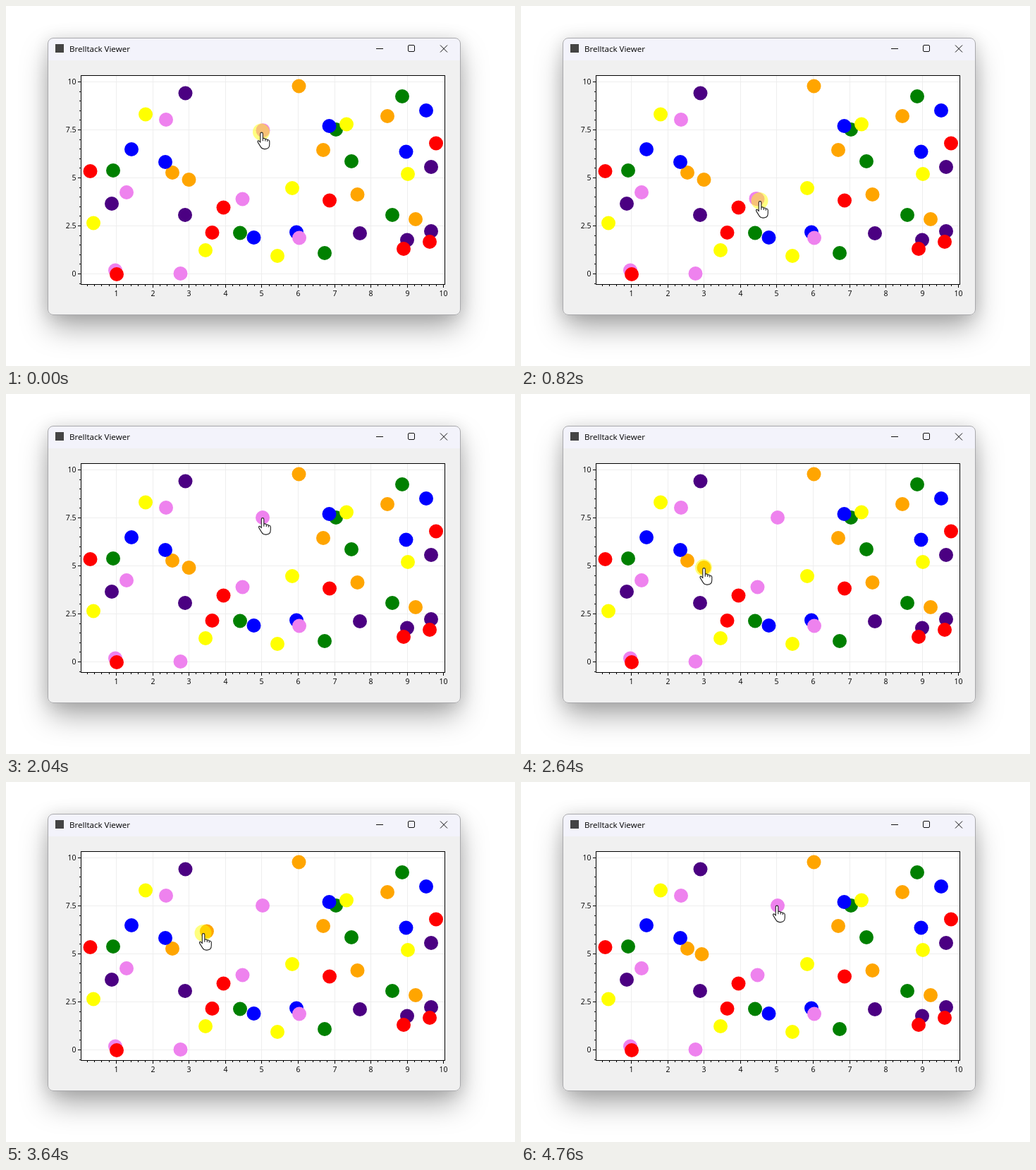
Animation, 722 px wide and 510 px high, one loop 4840 ms. Source, as an HTML page:

```html
<!DOCTYPE html>
<html lang="en">
<head>
<meta charset="utf-8">
<title>Draggable points</title>
<style>
  html, body { margin: 0; width: 100%; height: 100%; overflow: hidden; background: #fff; }
  #window {
    position: absolute; left: 59px; top: 44.5px; width: 584px; height: 391px;
    border: 1px solid #a9a9ac; border-radius: 8px;
    background: linear-gradient(#f3f3fb 31px, #f0f0f0 31px);
    box-shadow: 0 20px 40px -3px rgba(0, 0, 0, .34), 0 1px 22px rgba(0, 0, 0, .12);
  }
  svg { position: absolute; left: 0; top: 0; }
  text { font: 10.5px "Open Sans", "Noto Sans", sans-serif; fill: #000; }
  .title { font-size: 11.6px; }
  .x { text-anchor: middle; }
  .y { text-anchor: end; }
</style>
</head>
<body>
<div id="window"></div>
<svg width="722" height="510" viewBox="0 0 722 510">
  <rect x="70" y="54" width="12" height="12" fill="#444"/>
  <text class="title" x="90" y="65">Brelltack Viewer</text>
  <g fill="none" stroke="#111">
    <path d="M525 60.5h10M616 55.5l10 10m0-10l-10 10"/>
    <rect x="570.5" y="55.5" width="9" height="9" rx="1.5"/>
  </g>
  <rect x="106.5" y="98.5" width="516" height="296" fill="#fff"/>
  <path id="grid" stroke="#eee"/>
  <g id="dots"></g>
  <rect x="106.5" y="98.5" width="516" height="296" fill="none" stroke="#000"/>
  <path id="ticks" stroke="#000"/>
  <g id="labels"></g>
  <circle id="halo" r="12" fill="#ff0" opacity=".5"/>
  <path id="hand" fill="#fff" stroke="#222" stroke-width="1.1" stroke-linejoin="round"
    d="M-2 13V1.7a1.7 1.7 0 0 1 3.5 0V8.5l1-.3q2-.3 2.5 1.2q2-.6 3 1q2.5-.4 3 2v4.5q0 6.5-6 6.5h-1.5q-3.5 0-5-3l-4-6.5q-.8-1.8.5-2.2q1.5-.3 3 2.3zM1.5 8.5v3.5M5 9.4v3M8 10.4v2.6"/>
</svg>
<script>
const LOOP = 4840, STEPS = 48, LAG = .25;
const $ = id => document.getElementById(id);

function add(parent, tag, attrs, text = "") {
  const el = document.createElementNS("http://www.w3.org/2000/svg", tag);
  for (const name in attrs) el.setAttribute(name, attrs[name]);
  el.textContent = text;
  return parent.appendChild(el);
}

// Axes
const px = x => Math.floor(104.81 + 51.6 * x) + .5;
const py = y => Math.floor(379.6 - 27.22 * y) + .5;
let grid = "", ticks = "";
for (let i = 1; i <= 50; i++) {
  const x = px(i / 5), major = i % 5 === 0;
  ticks += `M${x} 395v${major ? 4 : 2}`;
  if (!major) continue;
  grid += `M${x} 99V394`;
  add($("labels"), "text", { class: "x", x, y: 411 }, i / 5);
}
for (let i = -1; i <= 20; i++) {
  const y = py(i / 2), major = i % 5 === 0;
  ticks += `M106 ${y}h${major ? -4 : -2}`;
  if (!major) continue;
  grid += `M107 ${y}H622`;
  add($("labels"), "text", { class: "y", x: 99.5, y: y + 3.7 }, i / 2);
}
$("grid").setAttribute("d", grid);
$("ticks").setAttribute("d", ticks);

// The scatter's data: x and y in turn, by colour
const points = {
  green: [562, 128, 468, 175, 490, 220, 152, 233, 332, 321.5, 452, 350, 548, 296],
  orange: [415.5, 113.5, 541, 156, 450, 204, 236, 236, 498.5, 267, 581, 302],
  indigo: [254.5, 123.5, 150, 280, 254, 296, 502, 322, 603, 228, 603, 319, 569, 331.5],
  blue: [178, 203, 226, 221, 458.5, 170, 596, 148, 567.5, 206.5, 351.5, 328, 412, 320.5],
  yellow: [198, 153.5, 124, 307.5, 283, 346, 385, 354, 406, 258, 483, 167.5, 570, 238],
  violet: [227, 161, 171, 264, 335.5, 273.5, 247.5, 379, 155, 374.5, 416, 328.5],
  red: [119.5, 234, 308.5, 285.5, 292.5, 321, 459, 275.5, 610, 194.5, 564, 344, 601, 334, 157, 380]
};
const dot = (fill, cx = 0, cy = 0) => add($("dots"), "circle", { r: 10, fill, cx, cy });
for (const color in points)
  for (let i = 0; i < points[color].length; i += 2)
    dot(color, points[color][i], points[color][i + 1]);

// Points that get dragged, with the steps of press and release
const dragged = [
  { el: dot("violet"), from: 0, to: 17 },
  { el: dot("orange"), from: 26, to: 42 }
];

// Key points of the pointer's path: step, x, y
const path = [
  [-1, 360, 167], [0, 363.5, 178.5], [4, 270.5, 186.5], [8, 340, 276], [10, 400, 248],
  [13, 361.5, 180], [16, 365, 175], [20, 365, 175], [25, 260.5, 246], [26, 260.5, 246],
  [29, 309.5, 286], [32, 375, 243], [34, 345, 197], [36, 281, 214],
  [40, 257.5, 244], [43, 257.5, 244], [47, 364, 174.5]
];

// Speed at a key point; the pointer comes to rest where it pauses
function speed(i, axis) {
  const [a, b, c] = [path[i - 1], path[i], path[i + 1]];
  if (!a || !c || a[axis] === b[axis] || b[axis] === c[axis]) return 0;
  return (c[axis] - a[axis]) / (c[0] - a[0]);
}

// Smooth curve through the key points
function pointer(step) {
  const i = path.findIndex(p => p[0] >= step);
  const a = path[i - 1], b = path[i], span = b[0] - a[0], u = (step - a[0]) / span;
  return [1, 2].map(axis =>
    a[axis] + (b[axis] - a[axis]) * u * u * (3 - 2 * u)
    + span * u * (1 - u) * (speed(i - 1, axis) * (1 - u) - speed(i, axis) * u));
}

const place = (el, x, y) => el.setAttribute("transform", `translate(${x} ${y})`);

function draw(time) {
  const step = Math.floor(time % LOOP / LOOP * STEPS);
  const [x, y] = pointer(step);
  let pressed = false;
  for (const { el, from, to } of dragged) {
    const [dx, dy] = pointer(Math.min(Math.max(step, from), to) - LAG);
    place(el, dx - 1, dy);
    pressed ||= step >= from && step < to;
  }
  place($("hand"), x - .7, y + .7);
  place($("halo"), x - 1.5, y);
  $("halo").style.display = pressed ? "" : "none";
}

const start = performance.now();
function tick() {
  draw(performance.now() - start);
  requestAnimationFrame(tick);
}
tick();
</script>
</body>
</html>
```
